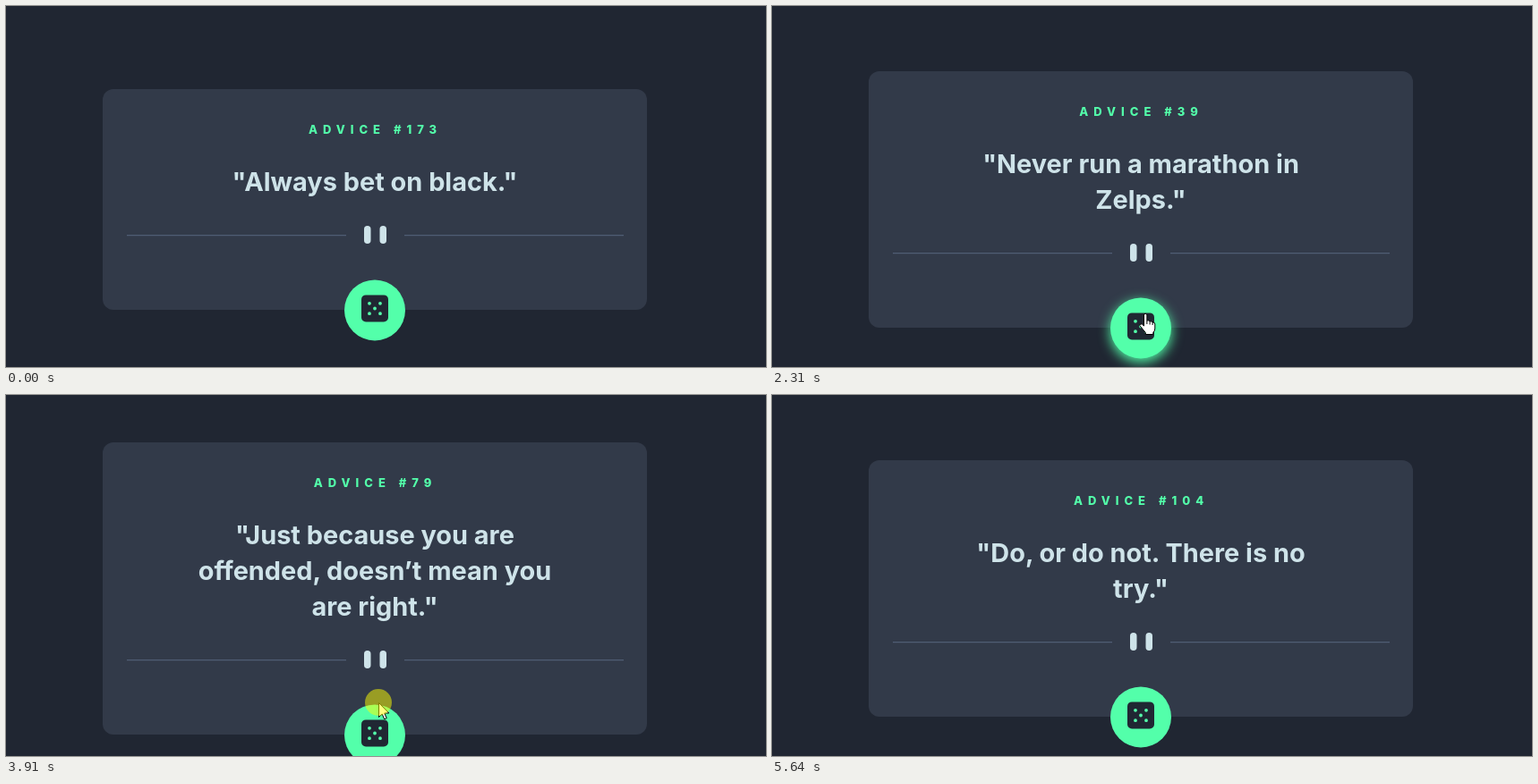
Animation, 849 px wide and 404 px high, one loop 6040 ms. Source, as an HTML page:

```html
<!DOCTYPE html>
<html lang="en">
<head>
<meta charset="utf-8">
<title>Advice generator</title>
<style>
html, body { margin: 0; width: 100%; height: 100%; overflow: hidden; background: #202632; }
svg { display: block; }
text { font-family: Inter, "Open Sans", sans-serif; text-anchor: middle; }
#label { font-size: 13px; font-weight: 800; letter-spacing: 6px; fill: #53ffaa; }
#quote { font-size: 28.9px; font-weight: 700; fill: #cee3e9; }
#glow { fill: #53ffaa; filter: blur(7px); }
#cursor path { fill: #fff; stroke: #000; stroke-linejoin: round; }
</style>
</head>
<body>
<svg width="849" height="404" viewBox="0 0 849 404">
  <rect id="card" x="108" width="608" rx="12" fill="#323a49"/>
  <text id="label" x="412.5"></text>
  <text id="quote"></text>
  <!-- y = 0 is the bottom edge of the card -->
  <g id="foot">
    <g transform="translate(135 -94) scale(1.25)">
      <path d="M0 8.5H196M248 8.5H444" stroke="#4f5d74"/>
      <path d="M215 3v10M229 3v10" stroke="#cee3e9" stroke-width="6" stroke-linecap="round"/>
    </g>
    <g transform="translate(412 .4)">
      <circle id="glow" cy="4" r="34"/>
      <circle r="34" fill="#53ffaa"/>
      <rect x="-15" y="-17" width="30" height="30" rx="5" fill="#202733"/>
      <path d="M-6-7.6h0M6-7.6h0M0-1.9h0M-6 3.8h0M6 3.8h0"
        stroke="#53ffaa" stroke-width="3.8" stroke-linecap="round"/>
    </g>
  </g>
  <g id="cursor">
    <path id="arrow" d="M.5.5V16.5L4.2 13 6.7 18.8 9.2 17.7 6.8 12H11.8Z"/>
    <g id="hand">
      <path d="M-.5 2a1.7 1.7 0 0 1 3.4 0v6q2.6-.8 3.2 1 2.3-.8 3 1 2.7-.4 2.7 2v5q0 2.5-2 4.5v2h-8.5v-2q-3-3.5-6.5-8 .5-2.5 2.5-1.5l2.2 2z"/>
      <path d="M2.9 8v4M6.1 9v3.5M9.1 10v3"/>
    </g>
    <circle id="click" r="15" fill="#ff0" fill-opacity=".5"/>
  </g>
</svg>
<script>
const LOOP = 6040, ENTER = 70, LEAVE = 5640;
const CLICK = 130, FADE = 190;
const $ = id => document.getElementById(id);

// start time, number, lines of the quote
const advice = [
  [0, 173, '"Always bet on black."'],
  [1520, 39, '"Never run a marathon in', 'Zelps."'],
  [2580, 112, '"It’s not about who likes you,', 'it’s about who you like."'],
  [3450, 79, '"Just because you are', 'offended, doesn’t mean you', 'are right."'],
  [5380, 104, '"Do, or do not. There is no', 'try."']
];

// the pointer's moves: start, end, and where it comes to rest
const origin = { x: 572, y: 394 };
const moves = [
  { from: ENTER, to: 390, x: 401, y: 354 },
  { from: 1440, to: 1720, x: 416, y: 344 },
  { from: 4390, to: 4780, x: 420, y: 360 },
  { from: 4920, to: LEAVE, x: 722, y: 397 }
];
const clicks = [660, 2180, 3045, 3910, 4780];
const hovers = [[200, 3910], [4520, 5250]];

// steep ease in and out
function ease(k) {
  k = Math.min(1, Math.max(0, k));
  return k ** 4 / (k ** 4 + (1 - k) ** 4);
}

function pointerAt(t) {
  let { x, y } = origin;
  for (const m of moves) {
    const k = ease((t - m.from) / (m.to - m.from));
    x += (m.x - x) * k;
    y += (m.y - y) * k;
  }
  return [x, y];
}

const show = (id, on) => $(id).setAttribute('visibility', on ? 'inherit' : 'hidden');

let shown;
function setAdvice(item) {
  if (item === shown) return;
  shown = item;
  const [, number, ...lines] = item;
  const top = 113 - 20 * lines.length, bottom = 320 + 20 * lines.length;
  $('card').setAttribute('y', top);
  $('card').setAttribute('height', bottom - top);
  $('label').setAttribute('y', top + 50);
  $('label').textContent = 'ADVICE #' + number;
  $('quote').innerHTML = lines.map((s, i) =>
    `<tspan x="412" y="${top + 114 + 40 * i}">${s}</tspan>`).join('');
  $('foot').setAttribute('transform', `translate(0 ${bottom})`);
}

function draw(t) {
  setAdvice(advice.findLast(a => t >= a[0]));

  const hover = hovers.find(([a, b]) => t >= a && t < b);
  $('glow').style.opacity = hover ? Math.min(1, (t - hover[0]) / FADE) : 0;

  show('cursor', t >= ENTER && t < LEAVE);
  $('cursor').setAttribute('transform', `translate(${pointerAt(t)})`);
  show('hand', hover);
  show('arrow', !hover);
  show('click', clicks.some(c => t >= c && t < c + CLICK));
}

const start = performance.now();
function frame() {
  draw((performance.now() - start) % LOOP);
  requestAnimationFrame(frame);
}
frame();
</script>
</body>
</html>
```
